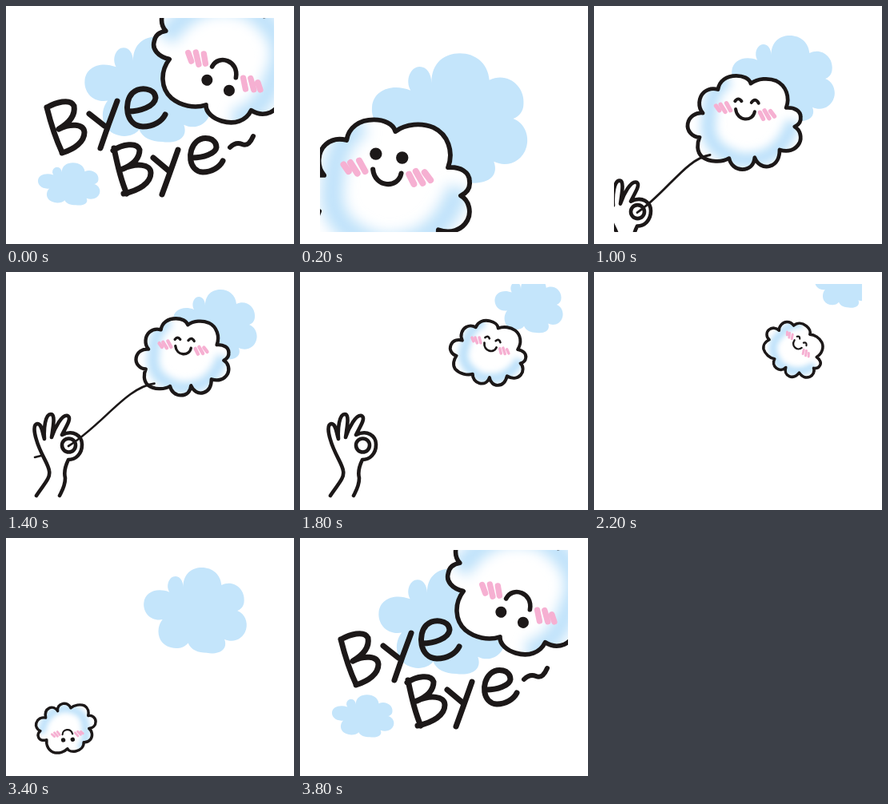
An HTML page for the animation above (4 s loop, 360 by 298 pixels).

```html
<!DOCTYPE html>
<html lang="en">
<head>
<meta charset="utf-8">
<title>Bye Bye</title>
<style>
  html, body { margin: 0; width: 100%; height: 100%; overflow: hidden; background: #fff; }
  svg { display: block; width: 360px; height: 298px; }
  .ink { fill: none; stroke: #1c1818; stroke-linecap: round; stroke-linejoin: round; }
  .sky { fill: #c4e5fb; }
  .blush { fill: none; stroke: #f6b0d2; stroke-width: 6.6; stroke-linecap: round; }
</style>
</head>
<body>
<svg viewBox="0 0 360 298" role="img" aria-label="Bye Bye~">
  <defs>
    <clipPath id="stage"><rect x="25" y="15" width="310" height="268"/></clipPath>
    <path id="puff" d="M-12-24C-12-38-3-44 7-44C18-44 26-37 27-26C39-32 51-22 50-10C50-4 46-1 43 0C51 3 54 12 52 19C49 30 38 33 30 29C34 40 24 45 12 43C3 43-4 40-7 33C-13 41-29 40-35 30C-39 22-37 14-33 9C-45 11-53 2-52-8C-51-19-39-24-26-19C-30-26-26-35-20-35C-15-35-12-30-12-24Z"/>
    <path id="body" d="M165 126C176 118 192 117 204 122C219 129 225 147 219 163C232 162 241 168 241 177C242 184 238 189 232 192C241 197 243 209 239 217C233 228 221 231 209 227C209 238 205 249 194 252C184 255 175 249 171 239C170 250 163 257 152 257C142 257 134 250 132 240C121 247 102 246 91 238C82 230 83 217 87 208C76 208 67 198 69 187C71 176 81 170 92 171C84 162 85 147 94 139C100 134 108 133 115 135C117 122 128 114 143 114C153 114 163 118 165 126Z"/>
    <clipPath id="inside"><use href="#body"/></clipPath>
    <filter id="soft" x="-30%" y="-30%" width="160%" height="160%"><feGaussianBlur stdDeviation="7"/></filter>
  </defs>
  <g clip-path="url(#stage)">
    <use id="far" class="sky" href="#puff"/>
    <use id="near" class="sky" href="#puff" transform="translate(78.5 223) scale(.74 .61)"/>
    <path id="tail" class="ink" stroke-width="2.6" d="M36 232L48 229"/>
    <g id="cloud">
      <use href="#body" fill="#fff"/>
      <g clip-path="url(#inside)">
        <path d="M132 119C112 128 102 150 101 180C96 212 112 232 150 243C188 245 216 228 230 184" fill="none" stroke="#bfe2fa" stroke-width="23" filter="url(#soft)"/>
      </g>
      <use id="rim" class="ink" href="#body"/>
      <path class="blush" d="M112 160l5 7M119 158l7 11M128 156l6 11M179 170l5 10M186 167l7 12M195 168l6 8"/>
      <g id="open" fill="#1c1818"><circle cx="145" cy="149" r="6.3"/><circle cx="172" cy="153" r="6.3"/></g>
      <path id="shut" class="ink" stroke-width="4.8" d="M141 153q5-7 10 0M166 155q6-8 11 1"/>
      <path class="ink" stroke-width="5" d="M142 165C144 184 168 185 171 169"/>
    </g>
    <g id="hand" class="ink" stroke-width="4.6">
      <path fill="#fff" d="M38 280C47 266 56 258 54 249C53 240 43 228 38 210C35 200 34 191 39 190C45 190 45 200 48 209C47 196 49 178 56 178C62 178 59 193 57 207C61 195 70 178 77 180C83 183 74 195 70 204C84 197 95 205 95 216C95 228 87 235 78 235C74 243 72 250 74 258C74 268 70 274 67 280"/>
      <circle cx="78.5" cy="217" r="8.5"/>
    </g>
    <path id="string" class="ink"/>
    <g id="bye" class="ink" stroke-width="7">
      <path d="M51 127C56 147 62 166 70 183M51 127C62 121 80 115 85 125C87 137 78 147 66 154C80 147 97 147 98 158C98 170 86 179 70 184"/>
      <path d="M104 135L123 150M139 119C131 140 125 157 118 178"/>
      <path d="M154 132C168 132 187 126 188 115C187 102 168 101 159 109C148 120 150 150 172 151C186 151 196 144 200 136" transform="translate(-1 -13) translate(0 13)"/>
      <path d="M135 178C139 198 143 217 151 235M134 181C145 173 164 170 167 180C167 191 158 199 146 204C163 196 181 198 181 209C181 222 166 231 147 235"/>
      <path d="M184 190L203 206M215 180C208 200 202 217 195 236"/>
      <path d="M233 190C246 190 262 185 263 177C263 165 247 162 238 170C226 181 228 207 246 208C257 208 267 202 271 194"/>
      <path d="M280 177C285 172 290 171 295 173C302 176 306 170 309 163" stroke-width="6"/>
    </g>
  </g>
</svg>
<script>
  const STEP = 200, COUNT = 20, LAST = COUNT - 1;
  const el = id => document.getElementById(id);
  const show = (id, on) => el(id).style.display = on ? '' : 'none';
  const move = (id, x, y, rest = '') => el(id).setAttribute('transform', `translate(${x} ${y}) ${rest}`);

  // flight of the cloud as step, x, y; and its turning as step, degrees
  const path = [
    [1, 107, 229], [3, 155, 185], [7, 220.5, 106], [11, 249.5, 96], [13, 273, 165],
    [15, 247, 225], [16, 209, 233], [17, 76, 238], [18, 96, 79], [19, 280, 64]
  ];
  const turn = [[1, 0], [8, 0], [11, 39], [15, 140], [19, 197]];

  function along(keys, i) {
    const n = Math.max(1, keys.findIndex(k => k[0] >= i));
    const [a, b] = [keys[n - 1], keys[n]];
    const u = (i - a[0]) / (b[0] - a[0]);
    return a.slice(1).map((v, j) => v + (b[j + 1] - v) * u);
  }

  // shrinks while drifting off, then rushes back towards the viewer
  const cloudScale = i => Math.max(.82 ** ((i - 3) / 2), 1.12 * .62 ** (LAST - i));

  function drawFar(i, ending) {
    const k = 4 - Math.abs(i - 11);
    if (ending) move('far', 177, 105, 'scale(1.51)');
    else move('far', 261 + 12.4 * k, 66 - 12.5 * k, `scale(${.902 ** k})`);
  }

  function drawString(x, y, s, hx, hy) {
    const ax = x - 52 * s, ay = y + 50 * s;
    const at = (u, v) => `${ax + (78 + hx - ax) * u} ${ay + (218 + hy - ay) * v}`;
    el('string').setAttribute('d', `M${at(0, 0)}C${at(.33, .06)} ${at(.6, .66)} ${at(1, 1)}`);
    el('string').setAttribute('stroke-width', 2 + s);
  }

  function draw(i) {
    const [x, y] = along(path, i);
    const [r] = along(turn, i);
    const s = cloudScale(i);
    const ending = i >= 18;
    const awake = i < 5 || i > 16;
    const rise = Math.max(0, 7 - i);
    const hx = -12 * rise, hy = 20.3 * rise;

    drawFar(i, ending);
    move('cloud', x, y, `rotate(${r}) scale(${s}) translate(-155 -185)`);
    el('rim').setAttribute('stroke-width', 5.3 / Math.sqrt(s));
    drawString(x, y, s, hx, hy);
    move('hand', hx, hy);
    move('tail', hx, hy);

    show('open', awake);
    show('shut', !awake);
    show('hand', i > 4 && i < 10);
    show('tail', i > 4 && i < 9);
    show('string', i > 1 && i < 9);
    show('bye', ending);
    show('near', i === LAST);
  }

  let shown;
  function tick() {
    // the farewell pose is held across the loop's seam
    const i = Math.floor(performance.now() / STEP) % COUNT || LAST;
    if (i !== shown) draw(shown = i);
    requestAnimationFrame(tick);
  }
  tick();
</script>
</body>
</html>
```
